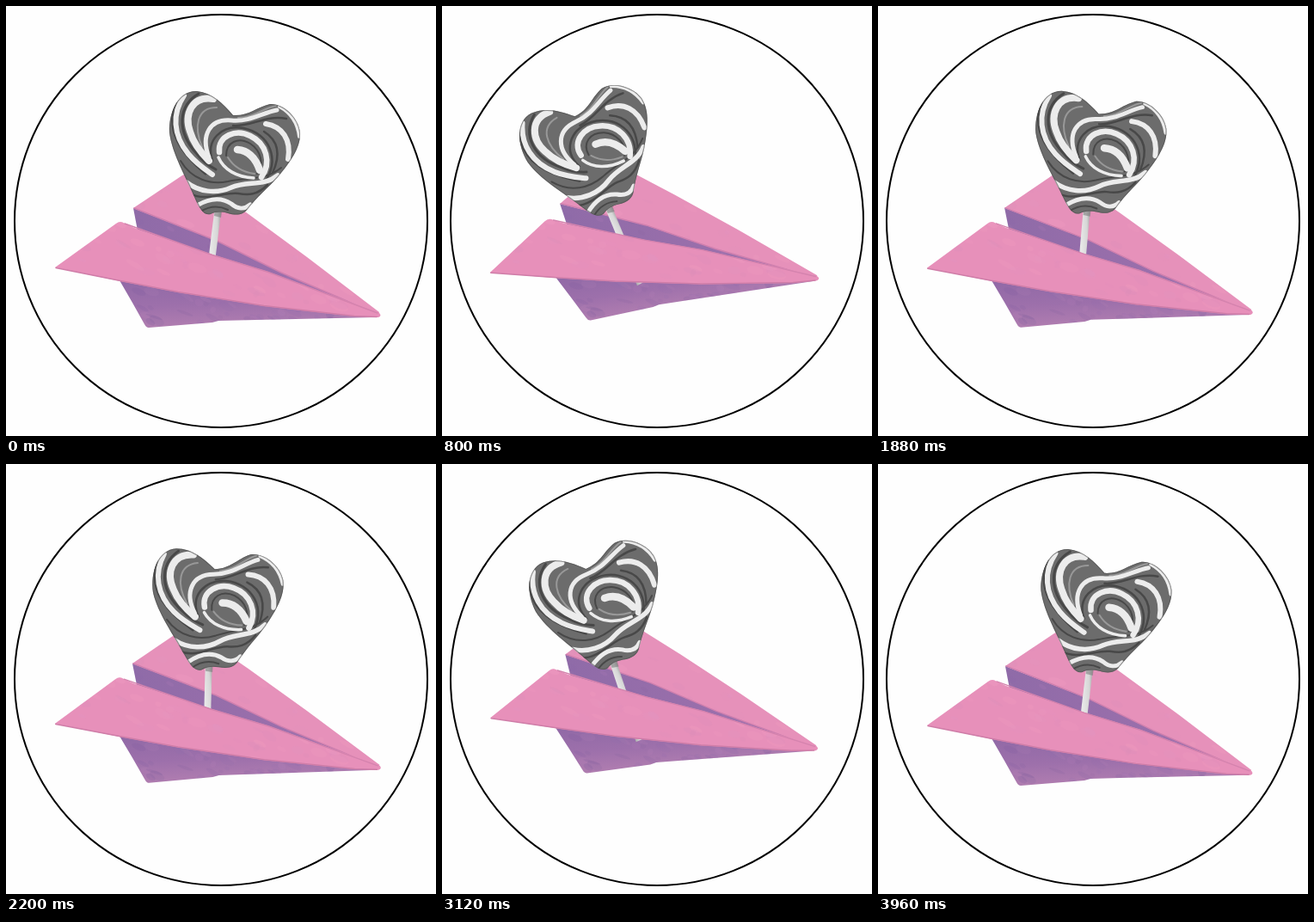
Write an HTML page that moves like this. It is 500 by 500 pixels and loops after 4000 ms.

```html
<!DOCTYPE html>
<html lang="en">
<head>
<meta charset="utf-8">
<title>Lollipop on a paper plane</title>
<style>
  html, body { margin: 0; width: 100%; height: 100%; overflow: hidden; background: #fefefe; }
  svg { display: block; width: 100vw; height: 100vh; }
  .line { fill: none; stroke-linecap: round; stroke-linejoin: round; }
</style>
</head>
<body>
<svg viewBox="0 0 500 500">
  <defs>
    <linearGradient id="keelTone" x1="0" y1="0" x2=".15" y2="1">
      <stop offset="0" stop-color="#9069a6"/>
      <stop offset=".55" stop-color="#9d70ab"/>
      <stop offset="1" stop-color="#b07db0"/>
    </linearGradient>
    <linearGradient id="foldTone" x1="0" y1="0" x2="1" y2="0">
      <stop offset="0" stop-color="#8f6ba8"/>
      <stop offset=".6" stop-color="#9a6fab"/>
      <stop offset="1" stop-color="#b277ae"/>
    </linearGradient>
    <linearGradient id="stickTone" x1="0" y1="0" x2="1" y2="0">
      <stop offset="0" stop-color="#a9a9a9"/>
      <stop offset=".35" stop-color="#e9e9e9"/>
      <stop offset=".75" stop-color="#d6d6d6"/>
      <stop offset="1" stop-color="#9b9b9b"/>
    </linearGradient>
    <path id="back" d="M148 235 L205 197 Q212 192 218 197 L282 242 L350 292 L434 356 L432 360 L385 338 L320 310 L245 273Z"/>
    <path id="fold" d="M148 235 L245 273 L320 310 L385 338 L432 360 L400 350 L240 292 L153 261Z"/>
    <path id="near" d="M57 304 L128 253 Q133 249 138 253 L149 258 L240 289 L305 309 L385 339 L433 356 Q438 360 433 362 L405 361 L300 349 L200 333 L133 320Z"/>
    <path id="keel" d="M132 319 L200 331 L300 347 L405 360 L430 362 L290 365 L247 366 L240 368 L166 374 Q163 374 161 370 L147 345Z"/>
    <path id="heart" d="M264 127 C252 113 240 101 222 99 C200 98 189 124 190 147 C193 172 210 200 219 222 C225 236 230 244 238 242 C244 239 250 239 258 241 C268 244 276 243 281 236 C292 222 305 211 316 199 C330 182 343 165 342 147 C340 130 323 113 307 114 C290 118 283 128 264 127Z"/>
    <clipPath id="backClip"><use href="#back"/></clipPath>
    <clipPath id="foldClip"><use href="#fold"/></clipPath>
    <clipPath id="nearClip"><use href="#near"/></clipPath>
    <clipPath id="keelClip"><use href="#keel"/></clipPath>
    <clipPath id="heartClip"><use href="#heart"/></clipPath>
  </defs>

  <rect width="500" height="500" fill="#fefefe"/>
  <circle cx="250" cy="250" r="240" fill="none" stroke="#000" stroke-width="2"/>

  <g id="plane">
    <use href="#keel" fill="url(#keelTone)"/>
    <g id="keelWash" clip-path="url(#keelClip)"/>
    <use href="#fold" fill="url(#foldTone)"/>
    <g id="foldWash" clip-path="url(#foldClip)"/>
    <use href="#back" fill="#e691ba"/>
    <g id="backWash" clip-path="url(#backClip)"/>
    <path class="line" d="M149 235 L245 273 L320 310 L385 338 L428 357" stroke="#cf7fae" stroke-width="1.5"/>

    <g id="lolly">
      <path d="M243 232 L251 232 L238.500 334 L230.500 334Z" fill="url(#stickTone)"/>
      <path d="M243 236 L251.500 236 L250 246 L242 244Z" fill="#777" opacity=".55"/>
      <use href="#heart" fill="#6c6c6c"/>
      <g id="stripes" clip-path="url(#heartClip)"/>
    </g>

    <use href="#near" fill="#e790ba"/>
    <g id="nearWash" clip-path="url(#nearClip)"/>
    <path class="line" d="M138 253 L240 289.500 L305 309.500 L385 339.500 L432 357" stroke="#d583ae" stroke-width="1.4"/>
    <path class="line" d="M58 304.500 L133 319.500 L200 332.500 L300 348.500 L405 360.500 L431 361.500" stroke="#cf7da8" stroke-width="1.5"/>
  </g>
</svg>

<script>
const $ = id => document.getElementById(id);

function add(parent, tag, attrs) {
  const el = document.createElementNS(parent.namespaceURI, tag);
  for (const key in attrs) el.setAttribute(key, attrs[key]);
  parent.appendChild(el);
}

// Candy bands: path, width, tone
const WHITE = '#ececec', PALE = '#989898', DARK = '#484848';
const bands = [
  ['M198 112 C184 145 205 172 232 195', 3, DARK],
  ['M224 102 C200 116 198 146 222 172 C228 180 236 186 244 190', 3, DARK],
  ['M203 180 C216 202 238 208 258 204 C284 198 300 204 320 188', 2, DARK],
  ['M214 218 C232 228 254 216 270 218 C282 220 292 220 304 208', 2.5, DARK],
  ['M245 118 C222 118 218 140 228 164', 2, PALE],
  ['M264 139 C284 141 302 126 326 131', 2.5, DARK],
  ['M270 130 C288 130 298 119 314 116', 2, PALE],
  ['M300 146 C316 156 320 172 310 194', 2.5, DARK],
  ['M240 180 C232 156 250 138 276 142 C306 148 320 178 300 206', 2.5, DARK],
  ['M256 174 C256 158 270 152 284 160 C296 168 301 184 292 195', 2, DARK],
  ['M258 176 C264 186 274 193 289 195', 2, PALE],
  ['M207 104 C193 125 194 150 212 172 C222 184 230 189 240 196', 6, WHITE],
  ['M241 108 C216 104 207 126 214 146 C218 160 226 170 236 180', 8, WHITE],
  ['M236 176 C226 150 237 131 262 133 C284 135 298 124 315 121', 5, WHITE],
  ['M248 170 C246 150 268 143 284 151 C303 160 309 182 297 199', 6.5, WHITE],
  ['M247 176 C253 190 268 199 288 200', 3.5, WHITE],
  ['M269 167 C281 168 290 176 295 191', 8.5, WHITE],
  ['M302 137 C321 140 332 155 328 178', 6, WHITE],
  ['M318 117 C331 124 339 135 341 152', 4, WHITE],
  ['M210 205 C224 216 244 219 262 211 C280 203 300 210 316 197', 5.5, WHITE],
  ['M222 232 C236 224 250 222 262 230 C269 236 277 237 284 231', 5, WHITE],
  ['M226 239 C236 233 246 231 258 237', 2, DARK]
];
for (const [d, width, stroke] of bands)
  add($('stripes'), 'path', { d, stroke, 'stroke-width': width, class: 'line' });
add($('stripes'), 'use', { href: '#heart', fill: 'none', stroke: '#505050', 'stroke-width': 2, opacity: .6 });

// Faint watercolour mottling
let seed = 7;
const rnd = () => (seed = seed * 16807 % 2147483647) / 2147483647;

function wash(id, count, [x, y, w, h], tones) {
  for (let i = 0; i < count; i++) {
    const cx = x + rnd() * w, cy = y + rnd() * h;
    add($(id), 'ellipse', {
      cx, cy, rx: 3 + rnd() * 9, ry: 1.5 + rnd() * 3.5,
      fill: tones[i % tones.length], opacity: .08 + rnd() * .14,
      transform: `rotate(${15 + rnd() * 20} ${cx} ${cy})`
    });
  }
}
const pinks = ['#d58bb8', '#f3a0c0', '#dd94c2'];
const purples = ['#7c5c9c', '#b783b8', '#8a68aa'];
wash('nearWash', 110, [60, 250, 370, 112], pinks);
wash('backWash', 70, [150, 195, 270, 160], pinks);
wash('foldWash', 70, [148, 236, 260, 110], purples);
wash('keelWash', 80, [132, 320, 250, 54], purples);

const LOOP = 4000, HALF = 2000, STEP = 40;

// Out and back over one half loop, lingering at the far end
const sway = u => (1 - Math.cos(2 * Math.PI * u)) / 2 + .09 * (1 - Math.cos(4 * Math.PI * u));

function draw(ms) {
  const t = Math.floor(ms % LOOP / STEP) * STEP;
  const second = t >= HALF;
  const u = t % HALF / HALF;
  const swing = sway(second ? u ** .93 : u);
  const tilt = second ? -3.1 * swing : -7.9 * sway(u ** 1.1);
  $('plane').setAttribute('transform', `translate(0 ${-19.3 * swing}) rotate(${tilt} 248 326)`);
  $('lolly').setAttribute('transform', `rotate(${-22.8 * swing} 245.5 352)`);
}

const start = performance.now();
function tick() {
  draw(performance.now() - start);
  requestAnimationFrame(tick);
}
tick();
</script>
</body>
</html>
```
